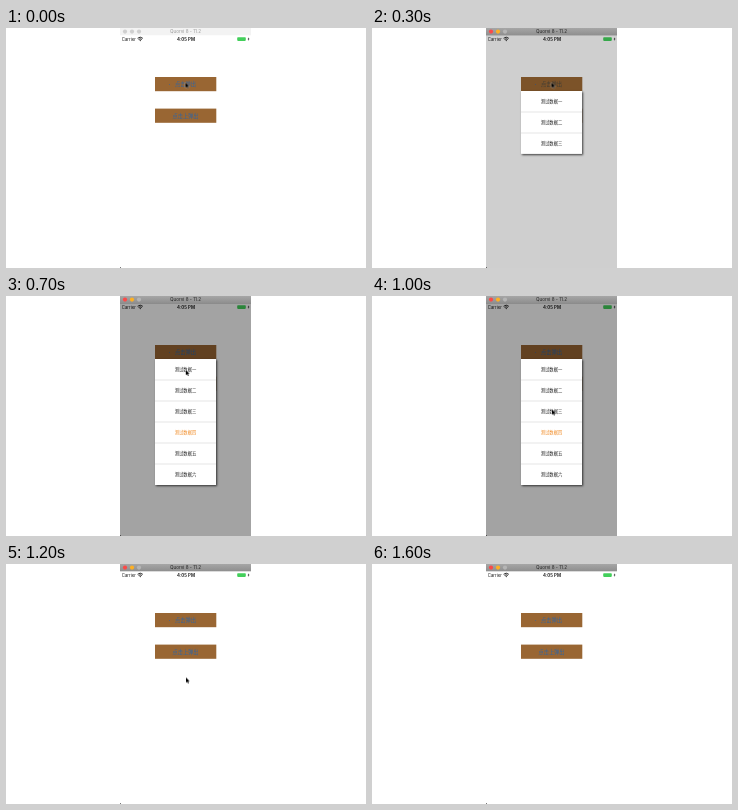
These frames come from a looping animation (360 by 240 pixels, 2 s). An HTML page:

```html
<!DOCTYPE html>
<html>
<head>
<meta charset="utf-8">
<title>Dropdown menu</title>
<style>
html, body { margin: 0; width: 100%; height: 100%; overflow: hidden; background: #fff; }
svg, div { position: absolute; display: block; }
svg { left: 0; top: 0; }
text { font-family: Inter, Roboto, sans-serif; text-anchor: middle; }
.cjk { font-family: "Noto Sans CJK SC", "Noto Sans CJK", sans-serif; }
.btn { font-size: 5.2px; font-weight: 500; fill: #2e64a4; }
.row { font-size: 4.3px; font-weight: 500; fill: #222; }
.picked { fill: #f08a24; }

.active, .press, #dim, #list, #cursor { animation: 2s step-end infinite; }
.active { animation-name: focus; }
.press { animation-name: press; }
#dim { left: 114px; top: 7px; width: 131px; height: 233px; background: #000; animation-name: dim; }
#list { left: 149px; top: 63px; width: 61px; overflow: hidden; background: #fff;
  box-shadow: 1px 1px 2px rgba(0, 0, 0, .7); animation-name: unfold; }
#cursor { animation-name: move; }

@keyframes focus { 0% { opacity: 0 } 5%, 100% { opacity: 1 } }
@keyframes press { 0%, 20%, 100% { fill: #2e64a4 } 10% { fill: #49483f } }
@keyframes dim {
  0%, 60%, 100% { opacity: 0 }
  15%, 55% { opacity: .19 }
  20% { opacity: .36 }
}
@keyframes unfold {
  0%, 60%, 100% { height: 0; visibility: hidden }
  15% { height: 63px; visibility: visible }
  20% { height: 125.5px; visibility: visible }
  55% { height: 64.5px; visibility: visible }
}
@keyframes move {
  0% { transform: translate(179.5px, 54.5px) }
  30% { transform: translate(179.6px, 60px) }
  35% { transform: translate(179.8px, 74px) }
  40% { transform: translate(180px, 94px) }
  45% { transform: translate(180px, 108px) }
  50% { transform: translate(180px, 113.5px) }
  65% { transform: translate(182px, 117px) }
  70% { transform: translate(193px, 133px) }
  75% { transform: translate(208px, 150px) }
  80%, 100% { transform: translate(-20px, -20px) }
}
</style>
</head>
<body>
<svg width="360" height="240">
  <defs>
    <linearGradient id="bar" x2="0" y2="1">
      <stop stop-color="#a6a6a6"/><stop offset="1" stop-color="#8e8e8e"/>
    </linearGradient>
  </defs>
  <rect x="114" width="131" height="7.3" fill="#f3f3f3"/>
  <g fill="#cfcfcf">
    <circle cx="119" cy="3.6" r="2.1"/><circle cx="126" cy="3.6" r="2.1"/><circle cx="133" cy="3.6" r="2.1"/>
  </g>
  <text x="179.5" y="5.4" font-size="4.6" fill="#999">Quorvi 8 - 11.2</text>
  <g class="active">
    <rect x="114" width="131" height="7.3" fill="url(#bar)"/>
    <circle cx="119" cy="3.6" r="2.1" fill="#fb4a48"/>
    <circle cx="126" cy="3.6" r="2.1" fill="#fdb024"/>
    <circle cx="133" cy="3.6" r="2.1" fill="#b5b5b5"/>
    <text x="179.5" y="5.4" font-size="4.6" fill="#222">Quorvi 8 - 11.2</text>
  </g>

  <text x="122.8" y="12.7" font-size="4.3" fill="#111">Carrier</text>
  <g fill="none" stroke="#111" stroke-width=".9">
    <path d="M131.6 10.3Q134.2 8 136.8 10.3M132.6 11.5Q134.2 10.1 135.8 11.5"/>
    <circle cx="134.2" cy="12.5" r=".3"/>
  </g>
  <text x="180" y="12.7" font-size="4.4" font-weight="600" fill="#111">4:05 PM</text>
  <rect x="231.2" y="9.2" width="8.6" height="3.7" rx=".8" fill="#43cf5b"/>
  <path d="M242.8 9.2l-1.2 2.1h.9l-.4 1.7 1.4-2.3h-.9z" fill="#111"/>

  <g fill="#996633">
    <rect x="149" y="49" width="61.3" height="14.2"/>
    <rect x="149" y="80.6" width="61.3" height="14.2"/>
  </g>
  <rect x="163" y="56" width="1" height="1" fill="#57647a"/>
  <text class="cjk btn press" x="179.5" y="58.2">点击弹出</text>
  <text class="cjk btn" x="179.5" y="89.7">点击上弹出</text>
  <rect x="114" y="239" width="1" height="1" fill="#777"/>
</svg>

<div id="dim"></div>

<div id="list">
  <svg width="61" height="126">
    <path d="M0 21H61M0 42H61M0 63H61M0 84H61M0 105H61" stroke="#d4d4d4" stroke-width=".6"/>
    <g class="cjk">
      <text class="cjk row" x="30.5" y="12">测试数据一</text>
      <text class="cjk row" x="30.5" y="33">测试数据二</text>
      <text class="cjk row" x="30.5" y="54">测试数据三</text>
      <text class="cjk row picked" x="30.5" y="75">测试数据四</text>
      <text class="cjk row" x="30.5" y="96">测试数据五</text>
      <text class="cjk row" x="30.5" y="117">测试数据六</text>
    </g>
  </svg>
</div>

<svg width="360" height="240">
  <path id="cursor" d="M0 0V5.2L1.2 4.1 2 6 2.9 5.6 2.1 3.8H3.7Z"
    fill="#000" stroke="#fff" stroke-width=".5" paint-order="stroke"/>
</svg>
</body>
</html>
```
